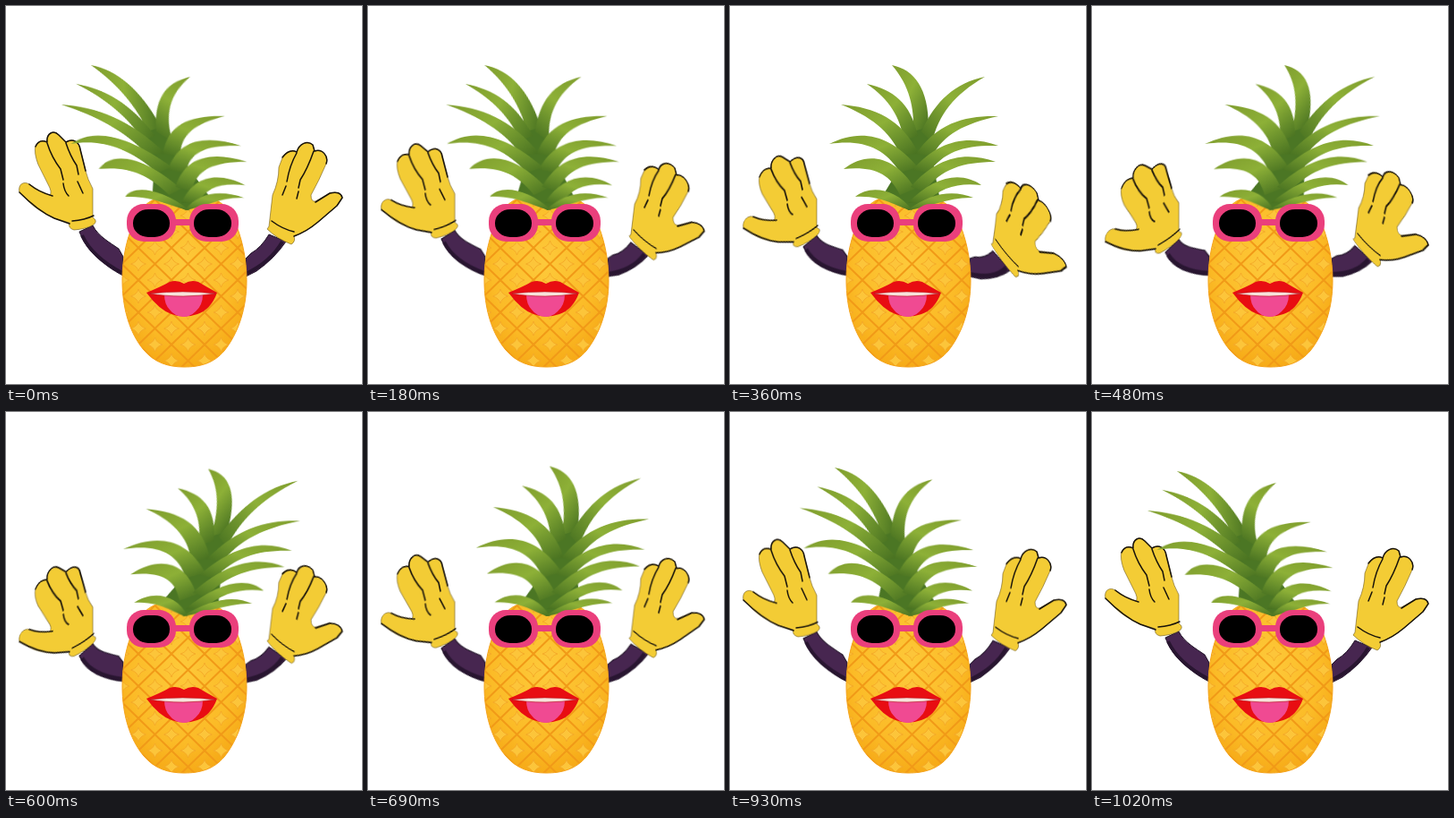
These frames come from a looping animation (398 by 422 pixels, 1.05 s). An HTML page:

```html
<!DOCTYPE html>
<html lang="en">
<head>
<meta charset="utf-8">
<title>Dancing pineapple</title>
<style>
html, body { margin: 0; width: 100%; height: 100%; overflow: hidden; background: #fff; }
svg { display: block; width: 100%; height: 100%; }
.crown, .arm { animation: 1050ms infinite; }
.crown { transform-origin: 200px 225px; animation-name: sway; }
.left { transform-origin: 130px 290px; animation-name: wave-left; }
.right { transform-origin: 268px 290px; animation-name: wave-right; }
.leaf-l { fill: url(#leafL); }
.leaf-r { fill: url(#leafR); }
.sleeve { fill: #472650; stroke: #1f1226; stroke-width: 1; }
.shade { fill: none; stroke: #281530; stroke-width: 4; }
.glove { fill: #f3cc35; stroke: #6d5818; stroke-width: .6; }
.ink { fill: none; stroke: #17120a; stroke-width: 1.5; stroke-linecap: round; stroke-linejoin: round; }

/* Each span advances in 30 ms steps. */
@keyframes sway {
  0% { transform: skewX(28.4deg) scaleY(1); animation-timing-function: steps(3); }
  8.5714% { transform: skewX(24.3deg) scaleY(1); animation-timing-function: steps(3); }
  17.1429% { transform: skewX(17.7deg) scaleY(1); animation-timing-function: steps(6); }
  34.2857% { transform: skewX(0deg) scaleY(1); animation-timing-function: steps(4); }
  45.7143% { transform: skewX(-12.1deg) scaleY(1); animation-timing-function: steps(2); }
  51.4286% { transform: skewX(-17.2deg) scaleY(1); animation-timing-function: steps(2); }
  57.1429% { transform: skewX(-15.6deg) scaleY(1.015); animation-timing-function: steps(3); }
  65.7143% { transform: skewX(-7.6deg) scaleY(1.034); animation-timing-function: steps(3); }
  74.2857% { transform: skewX(2deg) scaleY(1.052); animation-timing-function: steps(2); }
  80% { transform: skewX(10.9deg) scaleY(1.045); animation-timing-function: steps(3); }
  88.5714% { transform: skewX(21.4deg) scaleY(1.025); animation-timing-function: steps(3); }
  97.1429%, 100% { transform: skewX(28.4deg) scaleY(1); }
}
/* Both arms drop evenly, then ease back up; the right one drops faster. */
@keyframes wave-left {
  0% { transform: skewY(0deg); animation-timing-function: steps(18); }
  51.4286% { transform: skewY(-28.8deg); animation-timing-function: steps(2); }
  57.1429% { transform: skewY(-22.8deg); animation-timing-function: steps(3); }
  65.7143% { transform: skewY(-13.8deg); animation-timing-function: steps(5); }
  80% { transform: skewY(-3.8deg); animation-timing-function: steps(3); }
  88.5714% { transform: skewY(-1deg); animation-timing-function: steps(3); }
  97.1429%, 100% { transform: skewY(0deg); }
}
@keyframes wave-right {
  0% { transform: skewY(0deg); animation-timing-function: steps(6); }
  17.1429% { transform: skewY(19deg); animation-timing-function: steps(6); }
  34.2857% { transform: skewY(35.5deg); animation-timing-function: steps(4); }
  45.7143% { transform: skewY(26deg); animation-timing-function: steps(4); }
  57.1429% { transform: skewY(15.9deg); animation-timing-function: steps(3); }
  65.7143% { transform: skewY(9.2deg); animation-timing-function: steps(5); }
  80% { transform: skewY(3deg); animation-timing-function: steps(3); }
  88.5714% { transform: skewY(.7deg); animation-timing-function: steps(3); }
  97.1429%, 100% { transform: skewY(0deg); }
}
</style>
</head>
<body>
<svg viewBox="0 0 398 422">
  <defs>
    <linearGradient id="leafL" x1="0" y1="0" x2="1" y2="1">
      <stop offset="0" stop-color="#7f9d2d"/>
      <stop offset=".45" stop-color="#8db037"/>
      <stop offset="1" stop-color="#456f20"/>
    </linearGradient>
    <linearGradient id="leafR" x1="1" y1="0" x2="0" y2="1">
      <stop offset="0" stop-color="#7f9d2d"/>
      <stop offset=".45" stop-color="#8db037"/>
      <stop offset="1" stop-color="#456f20"/>
    </linearGradient>
    <radialGradient id="skin" cx=".48" cy=".4" r=".65">
      <stop offset="0" stop-color="#fdc93a"/>
      <stop offset=".65" stop-color="#fbbb27"/>
      <stop offset="1" stop-color="#f5a613"/>
    </radialGradient>
    <pattern id="cells" x="185" y="252" width="37" height="36" patternUnits="userSpaceOnUse">
      <path d="M0 18L18.5 0L37 18L18.5 36Z" fill="none" stroke="#f19a17" stroke-width="2"/>
      <g fill="#fcc53a" stroke="#f3a524" stroke-width=".8">
        <path id="star" d="M18.5 10Q20 16 27 18Q20 20 18.5 26Q17 20 10 18Q17 16 18.5 10Z"/>
        <use href="#star" x="-18.5" y="-18"/>
        <use href="#star" x="18.5" y="-18"/>
        <use href="#star" x="-18.5" y="18"/>
        <use href="#star" x="18.5" y="18"/>
      </g>
    </pattern>
    <path id="fruit" d="M199 210C226 210 244 216 254 237C264 258 269 282 269 307C269 337 260 365 244 385C232 399 217 403 199 403C181 403 166 398 154 384C138 365 130 337 130 306C130 281 135 257 146 235C156 216 173 210 199 210Z"/>
  </defs>

  <g class="arm left">
    <path class="sleeve" d="M82 252L97 245C103 257 116 264 126 271L131 280V301C119 295 110 288 102 281C92 272 86 262 82 252Z"/>
    <path class="shade" d="M85 256Q96 280 130 298"/>
    <path class="glove" d="M15 208C13 199 20 195 26 199Q37 207 49 211Q52 208 47 199L36 177Q31 164 33 156Q37 148 46 152C45 142 53 138 59 144L67 152C75 147 82 152 83 160L89 184Q91 193 97 204L97 236Q103 240 98 244Q90 249 76 250Q69 248 71 242L54 237Q36 229 25 218Z"/>
    <path class="ink" d="M15 208Q36 229 54 237L71 243M26 199Q37 208 52 212M33 157Q37 148 46 152C45 142 53 138 59 144L67 152C75 147 82 152 83 160L89 184M46 153Q51 169 61 182L64 194M67 153Q72 168 79 178L81 188M64 198Q65 207 70 212M80 196L86 209M74 240Q88 239 98 234"/>
  </g>

  <g class="arm right">
    <path class="sleeve" d="M268 282L274 276Q285 270 294 255L313 263Q300 282 280 296L268 302Z"/>
    <path class="shade" d="M268 299Q296 286 309 263"/>
    <path class="glove" d="M294 246L298 211Q305 196 305 180L310 167Q317 159 325 163C328 153 337 150 343 155L345 162C354 159 361 168 358 176Q350 195 341 211Q341 219 346 218L362 209Q374 206 376 214L370 223L349 241Q336 252 322 257Q324 263 319 266Q303 260 292 249Z"/>
    <path class="ink" d="M309 169Q317 159 325 163C328 153 337 150 343 155L345 162C354 159 361 168 358 176M346 219L362 209Q374 206 376 214L370 223L349 241Q336 252 322 257M325 164Q317 178 314 196M344 162Q337 182 329 194L327 203M313 201L309 211M327 207L325 215M297 240Q309 249 322 252"/>
  </g>

  <use href="#fruit" fill="url(#skin)"/>
  <use href="#fruit" fill="url(#cells)" stroke="#f4a31d" stroke-width="1"/>

  <g class="crown">
    <path fill="#4b7624" d="M204 130H222L226 170L234 212L200 228L170 213L190 180Z"/>
    <path class="leaf-l" d="M181 66C206 71 222 92 222 135L205 140C206 114 201 89 181 66Z"/>
    <path class="leaf-r" d="M285 79C251 86 230 106 214 140L226 152C233 122 250 99 285 79Z"/>
    <path class="leaf-l" d="M153 87C182 93 202 108 210 145L194 150C191 125 178 104 153 87Z"/>
    <path class="leaf-l" d="M124 110C162 113 192 126 211 165L190 166C180 140 155 122 124 110Z"/>
    <path class="leaf-r" d="M300 123C264 122 232 130 208 165L226 168C238 144 262 131 300 123Z"/>
    <path class="leaf-l" d="M111 154C142 138 177 140 210 180L190 186C172 156 145 149 111 154Z"/>
    <path class="leaf-r" d="M300 156C268 144 234 148 204 183L222 186C240 162 262 155 300 156Z"/>
    <path class="leaf-l" d="M127 182C152 162 184 166 207 204L190 211C178 186 160 179 127 182Z"/>
    <path class="leaf-r" d="M297 174C265 162 232 167 202 202L217 207C236 182 260 174 297 174Z"/>
    <path class="leaf-r" d="M281 200C258 184 228 190 199 220L218 220C236 202 256 197 281 200Z"/>
    <path class="leaf-l" d="M140 213C155 200 184 202 204 228C190 227 172 211 140 213Z"/>
    <path class="leaf-r" d="M272 214C250 205 225 208 198 228C222 225 245 213 272 214Z"/>
  </g>

  <g fill="#ea3f7c">
    <rect x="185" y="238" width="25" height="7"/>
    <rect x="135" y="221" width="55" height="42" rx="19"/>
    <rect x="205" y="221" width="55" height="42" rx="19"/>
  </g>
  <rect x="142" y="227" width="41" height="31" rx="17" ry="15"/>
  <rect x="210" y="227" width="42" height="31" rx="17" ry="15"/>

  <path fill="#e80d12" d="M157 320Q172 314 183 308Q191 305 199 310Q207 305 215 308Q225 314 236 320Q229 339 214 344Q199 349 185 344Q171 339 157 320Z"/>
  <path fill="#f04a92" d="M177 322H220Q220 334 212 341Q206 347 198 347Q188 346 183 339Q177 333 177 322Z"/>
  <path fill="#f8e4dc" stroke="#b3101a" stroke-width=".6" d="M161 321Q198 317 234 321Q216 324 198 324Q177 324 161 321Z"/>
</svg>
</body>
</html>
```
